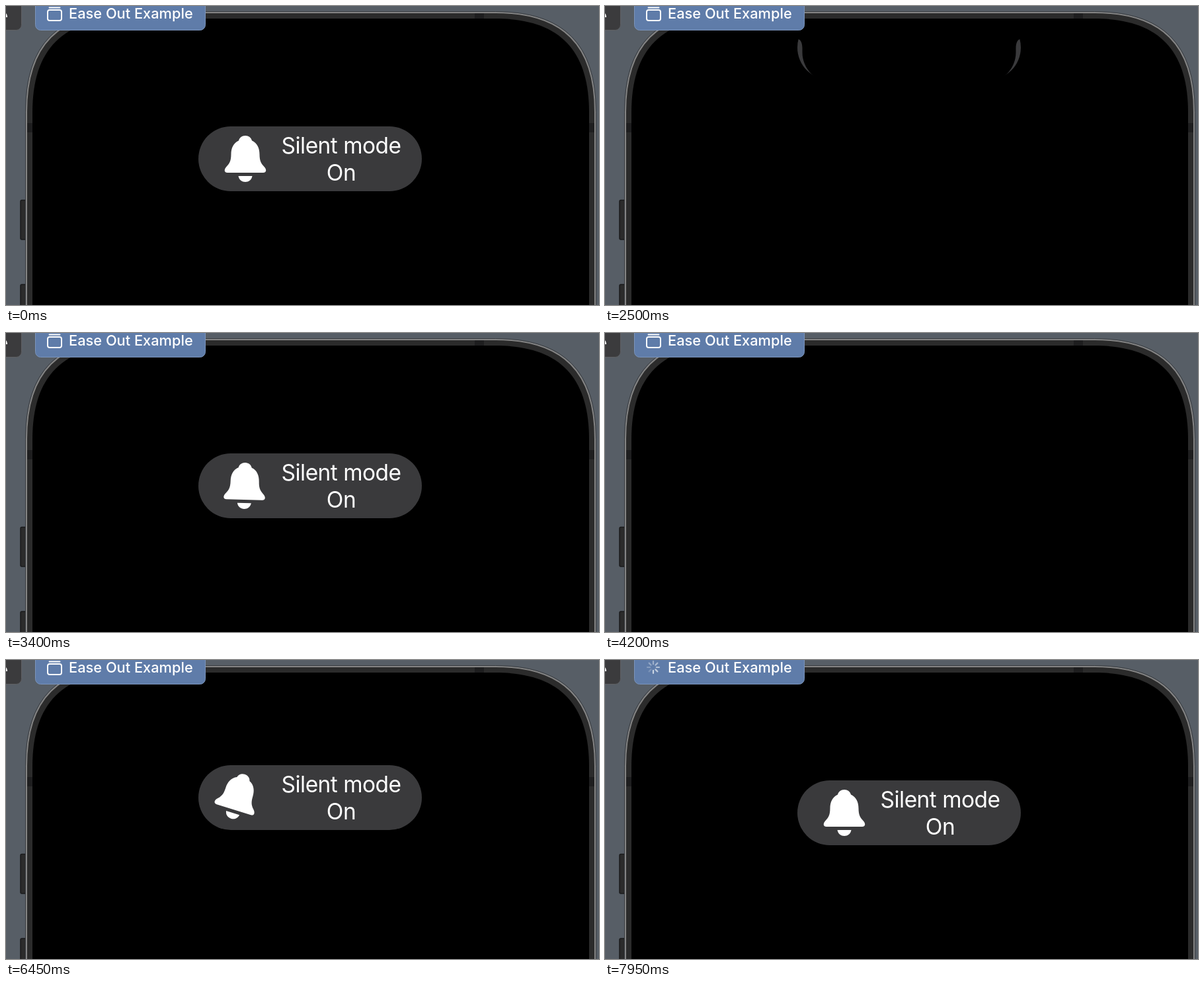
Animation, 897 px wide and 452 px high, one loop 8 s. Source, as an HTML page:

```html
<!DOCTYPE html>
<html lang="en">
<head>
<meta charset="utf-8">
<title>Silent mode</title>
<style>
html, body { margin: 0; width: 100%; height: 100%; overflow: hidden; background: #575e66; }
svg { display: block; width: 100vw; height: 100vh; }
text { font-family: Inter, Roboto, sans-serif; fill: #fff; }
.label { font-size: 33.5px; letter-spacing: -.55px; text-anchor: middle; }
.tab { font-size: 21.8px; font-weight: 500; }
</style>
</head>
<body>
<svg viewBox="0 0 897 452">
  <defs>
    <clipPath id="below"><rect y="50" width="897" height="402"/></clipPath>
  </defs>
  <rect width="897" height="452" fill="#575e66"/>

  <g fill="#2b2b2b" stroke="#1b1b1c" stroke-width="1.5">
    <rect x="22" y="293.5" width="12" height="59.5" rx="2"/>
    <rect x="22" y="421" width="12" height="59.5" rx="2"/>
  </g>

  <path id="rim" fill="#2b2b2b" stroke="#848484" stroke-width="2"/>
  <path id="edge" fill="none" stroke="#3a3d41" stroke-width="1"/>
  <g fill="#1e1e1f">
    <rect x="709" y="11" width="14" height="9"/>
    <rect x="32" y="177" width="9" height="14"/>
    <rect x="881" y="177" width="9" height="14"/>
  </g>
  <path id="screen"/>

  <g clip-path="url(#below)">
    <g id="pill">
      <rect x="291" y="182" width="338" height="98" rx="49" fill="#3a3a3c"/>
      <g id="bell" fill="#fff">
        <path d="M0 3C5 3 9 6 10 10.5C18 14 21.5 22 21.5 31C21.5 43 25 46 29 50.5C32.5 54.5 32 59 27 59H-27C-32 59-32.500 54.500-29 50.500C-25 46-21.500 43-21.500 31C-21.500 22-18 14-10 10.500C-9 6-5 3 0 3Z"/>
        <path d="M-10.500 64H10.500C9.500 70 5 73 0 73S-9.500 70-10.500 64Z"/>
      </g>
      <text class="label" x="507" y="223">Silent mode</text>
      <text class="label" x="507" y="264">On</text>
    </g>
    <path d="M291 50C296 50 298.500 56 298.500 64V70A46 46 0 0 0 344.500 116H575.500A46 46 0 0 0 621.500 70V64C621.500 56 624 50 629 50Z"/>
  </g>

  <rect x="-20" y="-20" width="43.500" height="56.500" rx="8" fill="#3b3b3d" stroke="#5f6063"/>
  <path d="M-3 10Q1.500 12.500 1 17" fill="none" stroke="#fff" stroke-width="2"/>
  <rect x="44.500" y="-20" width="257" height="56.500" rx="8" fill="#5f7ca9" stroke="#7b94bb"/>
  <g id="stack" fill="none" stroke="#fff" stroke-width="1.900" stroke-linecap="round">
    <rect x="63" y="6" width="21" height="16" rx="3"/>
    <path d="M65.500 2.500H81.500M67.500-1H79.500"/>
  </g>
  <g id="spinner" transform="translate(73 11)" stroke="#fff" stroke-width="2.200" stroke-linecap="round"></g>
  <text class="tab" x="95" y="19.300">Ease Out Example</text>
</svg>
<script>
const LOOP = 8000, TICK = 50, SPOKES = 8;
const SLIDE = { from: -260, time: 350 };
const SWING = { from: -90, response: .6, damping: .4 };
const RELOADS = [50, 3850, 7650], RELOAD_TIME = 350;
// start: motion begins behind the notch; shown..hidden: pill on stage
const VISITS = [
  { start: -3800, shown: 0, hidden: 400 },
  { start: 2419, shown: 2500, hidden: 4200 },
  { start: 6185, shown: 6300, hidden: LOOP }
];
const $ = id => document.getElementById(id);

// Phone outline with continuous corners, running past the bottom of the stage
function outline(l, t, r, len, ctl) {
  return `M${l} 470V${t + len}C${l} ${t + ctl} ${l + ctl} ${t} ${l + len} ${t}` +
    `H${r - len}C${r - ctl} ${t} ${r} ${t + ctl} ${r} ${t + len}V470Z`;
}
$("rim").setAttribute("d", outline(31, 10, 891, 150, 48.7));
$("edge").setAttribute("d", outline(29.5, 8.5, 892.5, 152, 49));
$("screen").setAttribute("d", outline(40, 19, 882, 142, 46));

const spokes = Array.from({ length: SPOKES }, (_, i) => {
  const line = document.createElementNS("http://www.w3.org/2000/svg", "path");
  line.setAttribute("d", "M0-4.800V-9");
  line.setAttribute("transform", `rotate(${i * 360 / SPOKES})`);
  return $("spinner").appendChild(line);
});

// cubic-bezier(0, 0, .58, 1)
function easeOut(x) {
  if (x >= 1) return 1;
  let lo = 0, hi = 1;
  for (let i = 0; i < 24; i++) {
    const s = (lo + hi) / 2;
    if (1.74 * s * s - .74 * s * s * s < x) lo = s; else hi = s;
  }
  return 3 * lo * lo - 2 * lo * lo * lo;
}

// Remaining share of a damped spring after t seconds
function spring(t, { response, damping }) {
  const w = 2 * Math.PI / response, decay = w * damping;
  const wd = w * Math.sqrt(1 - damping * damping);
  return Math.exp(-decay * t) * (Math.cos(wd * t) + decay / wd * Math.sin(wd * t));
}

const show = (el, on) => el.setAttribute("visibility", on ? "visible" : "hidden");

function draw(t) {
  const visit = VISITS.find(v => t >= v.shown && t < v.hidden);
  show($("pill"), visit);
  if (visit) {
    const age = t - visit.start;
    const y = SLIDE.from * (1 - easeOut(age / SLIDE.time));
    const angle = age > 1300 ? 0 : SWING.from * spring(age / 1000, SWING);
    $("pill").setAttribute("transform", `translate(0 ${y.toFixed(2)})`);
    $("bell").setAttribute("transform", `translate(362 193) rotate(${angle.toFixed(2)})`);
  }

  const reload = RELOADS.find(r => t >= r && t < r + RELOAD_TIME);
  const busy = reload !== undefined;
  show($("stack"), !busy);
  show($("spinner"), busy);
  if (busy) {
    const head = 1 + Math.floor((t - reload) / 100);
    spokes.forEach((line, i) => {
      const lag = (head - i + SPOKES) % SPOKES;
      line.setAttribute("stroke-opacity", (.68 - .07 * lag).toFixed(2));
    });
  }
}

const begin = performance.now();
function frame() {
  const t = (performance.now() - begin + 1) % LOOP;
  draw(Math.floor(t / TICK) * TICK);
  requestAnimationFrame(frame);
}
frame();
</script>
</body>
</html>
```
